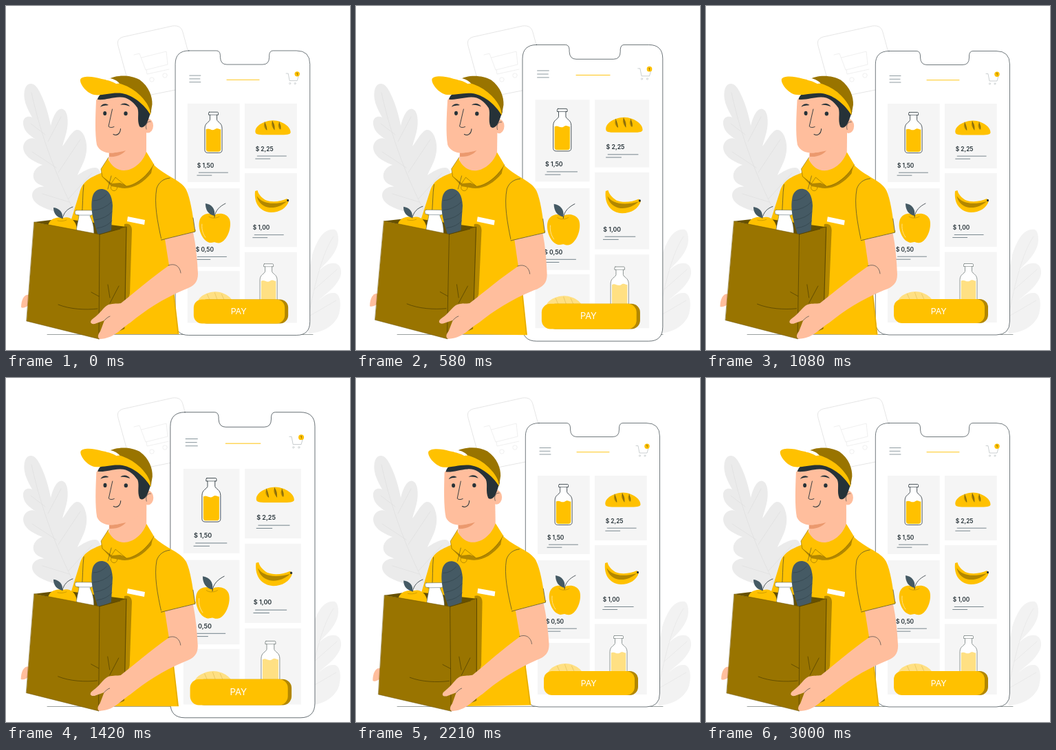
An HTML page with a canvas for the animation above (3.04 s loop, 500 by 500 pixels).

```html
<!DOCTYPE html>
<html lang="en">
<head>
<meta charset="utf-8">
<title>Grocery delivery</title>
<style>
html, body { margin: 0; width: 100%; height: 100%; overflow: hidden; background: #fff; }
canvas { display: block; width: 100vw; height: 100vh; }
</style>
</head>
<body>
<canvas id="stage"></canvas>
<script>
const LOOP = 3040;
const canvas = document.getElementById('stage');
const ctx = canvas.getContext('2d');

const C = {
  yellow: '#ffc100', shade: '#b28700', bag: '#997400', deep: '#665000', pale: '#ffe083',
  slate: '#455a64', ink: '#263238', skin: '#ffbe9d', blush: '#eb996e',
  card: '#f5f5f5', leaf: '#ebebeb', faint: '#e3e3e3'
};

const paths = new Map();
function path(d) {
  if (!paths.has(d)) paths.set(d, new Path2D(d));
  return paths.get(d);
}
function fill(d, color) {
  ctx.fillStyle = color;
  ctx.fill(path(d));
}
function line(d, color = C.ink, width = 0.6) {
  ctx.strokeStyle = color;
  ctx.lineWidth = width;
  ctx.stroke(path(d));
}
function shape(d, color, edge = C.ink, width = 0.6) {
  fill(d, color);
  line(d, edge, width);
}
function dot(x, y, rx, ry, color) {
  ctx.beginPath();
  ctx.ellipse(x, y, rx, ry, 0, 0, Math.PI * 2);
  ctx.fillStyle = color;
  ctx.fill();
}
function ring(x, y, r, color, width = 0.7) {
  ctx.beginPath();
  ctx.arc(x, y, r, 0, Math.PI * 2);
  ctx.strokeStyle = color;
  ctx.lineWidth = width;
  ctx.stroke();
}
function box(x, y, w, h, r, color) {
  ctx.beginPath();
  ctx.roundRect(x, y, w, h, r);
  ctx.fillStyle = color;
  ctx.fill();
}
function text(str, x, y, font, color) {
  ctx.font = font + ' Inter, "Open Sans", sans-serif';
  ctx.fillStyle = color;
  ctx.fillText(str, x, y);
}
function at(x, y, draw) {
  ctx.save();
  ctx.translate(x, y);
  draw();
  ctx.restore();
}

// Two linear beats per loop, then rest.
function phoneScale(t) {
  const rise = 435, fall = 280;
  for (const start of [-10, 1088]) {
    const u = t - start;
    if (u >= 0 && u < rise) return 1 + 0.1 * u / rise;
    if (u >= rise && u < rise + fall) return 1.1 - 0.1 * (u - rise) / fall;
  }
  return 1;
}

// Triangle wave between -1 and 1 degree.
function swayAngle(t) {
  const p = t / LOOP;
  const deg = p < 0.25 ? 4 * p : p < 0.75 ? 2 - 4 * p : 4 * p - 4;
  return deg * Math.PI / 180;
}

function backdrop() {
  fill('M35 113C28 114 25 124 27 136C29 146 34 154 38 162C33 159 26 161 25 168C24 180 33 188 44 194C36 189 25 195 25 206C26 219 40 226 53 231C45 233 38 241 40 250C42 257 50 261 58 263C49 261 38 266 38 275C38 288 56 294 74 300L100 316L140 250C136 237 134 235 129 235C121 235 111 241 104 246C108 235 119 221 117 201C115 184 106 177 100 181C92 187 88 197 82 204C85 192 92 177 89 160C87 149 80 147 75 152C70 157 67 166 65 174C62 158 57 141 50 127C46 118 41 112 35 113Z', C.leaf);
  line('M37 126C48 176 67 236 100 300M36 171L57 187M38 212L73 235M53 273L92 285M80 161L61 197M108 194L76 242M125 243L91 280', '#dcdcdc');

  fill('M478 325C462 322 452 340 445 362L430 440L440 476C455 475 476 469 484 448C488 433 486 418 477 417C468 416 461 423 454 428C465 418 484 406 487 389C488 377 481 373 473 374C465 375 459 381 453 386C463 375 482 360 483 341C483 333 482 327 478 325Z', '#f2f2f2');
  line('M476 335C460 358 448 405 436 470M481 383L448 412M480 428L442 450', C.faint);

  shape('M163 58C161 50 164 47 170 45L242 29C251 28 255 31 257 38L275 104C277 112 274 116 266 118L196 132C187 133 183 130 181 123Z', '#fff', C.faint, 0.9);
  line('M186 71L194 69L203 93L235 85L233 66L197 75M204 93L205 99L237 92', C.leaf, 0.8);
  ring(212, 107, 3.2, C.leaf, 0.8);
  ring(231, 101, 3.2, C.leaf, 0.8);

  line('M60 477.5H446', '#56615f');
}

function bottle(milk, edge) {
  shape('M-6 -29H6Q7 -29 7 -27V-25H5L5 -18C6 -14 12 -14 12.5 -6V26Q12.5 30 8 30H-8Q-12.5 30 -12.5 26V-6C-12 -14 -6 -14 -5 -18L-5 -25H-7V-27Q-7 -29 -6 -29Z', '#fff', edge, 0.8);
  fill('M-10.7 -4C-6 -7 -3 -1 2 -4C6 -7 8 -4 10.7 -4V25Q10.7 28.4 7 28.4H-7Q-10.7 28.4 -10.7 25Z', milk);
  line('M-5 -25H5', edge);
}

function loaf(color) {
  fill('M-25.5 7C-27 -2 -14 -10 0 -10.5C14 -10 26 -1 25.5 7C25 11 16 10.5 0 10.5C-16 10.5 -25 11 -25.5 7Z', color);
}
function slits(color) {
  fill('M-12 -7C-9 -3 -9 1 -9 4C-13 1 -14 -4 -12 -7ZM-1 -9C3 -5 3 -1 2 3C-2 -1 -3 -6 -1 -9ZM9 -7C12 -3 12 0 10 3C7 -1 7 -5 9 -7Z', color);
}

function apple() {
  fill('M0 -14C6 -18 18 -17 22 -8C26 4 18 24 8 26C4 27 2 25 0 25C-3 25 -5 27 -9 25C-19 21 -25 3 -21 -8C-17 -17 -6 -18 0 -14Z', C.yellow);
  line('M-8 -12C-4 -9 2 -9 7 -12', C.shade);
  line('M-18 -1C-19 9 -15 15 -13 18', '#ffe9a8', 0.8);
  line('M0 -11C1 -21 8 -27 16 -31', C.ink, 0.8);
  fill('M-13 -31C-4 -30 2 -23 0 -13C-9 -15 -13 -22 -13 -31Z', C.slate);
}

function banana() {
  fill('M362 269L365.5 268C367 274 371 278 377 282C387 286 399 284 408 280L411 283C408 294 397 300 385 300C370 299 360 288 362 269Z', C.yellow);
  fill('M364.5 276C371 286 385 290 408 284C400 291 390 294.5 380 292.5C371 290 366 284 364.5 276Z', C.shade);
  dot(409.5, 282.5, 1.5, 1.7, C.ink);
}

function price(str, x, y) {
  text(str, x, y, '600 8.4px', C.ink);
  line(`M${x + 2.5} ${y + 7.2}h42M${x} ${y + 11.2}h21`, C.slate, 0.7);
}

function phone(scale) {
  ctx.save();
  ctx.translate(343.7, 271.4);
  ctx.scale(scale, scale);
  ctx.translate(-343.7, -271.4);

  shape('M266 65.5H306Q311 65.5 311.5 72V75Q312 85.5 321 85.5H373Q382.5 85.5 382.5 75V72Q383 65.5 388 65.5H422Q441.5 65.5 441.5 85V458Q441.5 478 422 478H266Q246.3 478 246.3 458V85Q246.3 65.5 266 65.5Z', '#fff', C.ink, 0.65);

  line('M267 101.5h16M267 106.3h15M267 111h16', C.slate);
  line('M321 107.7h47', C.yellow, 0.9);
  line('M407 98.5h3L412 109H423L425 102', '#a8b0b3');
  ring(412.5, 113, 1.1, '#b8bec0', 0.6);
  ring(420, 113, 1.1, '#b8bec0', 0.6);
  dot(423, 99.3, 3.7, 3.7, C.yellow);
  text('1', 421.8, 101.1, '500 5px', C.deep);

  for (const [x, y, h] of [[264, 142, 114], [264, 265, 114], [264, 385, 75], [347, 142, 94], [347, 243, 107], [347, 357.5, 102.5]]) {
    box(x, y, 75.7, h, 0, C.card);
  }
  at(301.6, 183.5, () => bottle(C.yellow, C.ink));
  at(388, 177, () => { loaf(C.yellow); slits(C.shade); line('M-12 -8L-9 3M-1 -9.5L2 3M9 -8L11 2', C.ink, 0.5); });
  at(303, 318, apple);
  banana();
  at(381.5, 403.5, () => bottle(C.pale, '#77807f'));
  at(304.5, 425.5, () => { loaf(C.pale); line('M-12 -7L-8 2M-1 -9L3 2M9 -7L13 2', '#dfba52'); });

  price('$ 1,50', 278, 235);
  price('$ 2,25', 362.7, 211);
  price('$ 0,50', 276, 357);
  price('$ 1,00', 358.7, 325.3);

  box(280, 426, 130, 35, 12, C.shade);
  box(273, 426, 132, 35, 12, C.yellow);
  text('PAY', 326.7, 447.5, '400 12.3px', '#fff');
  ctx.restore();
}

function torso() {
  fill('M150 205L204 180V222C199 246 163 258 149 240Z', C.skin);
  fill('M150 213.5C160 214 169 211 176 207C172 215 161 220 150 219Z', C.blush);

  fill('M138 243C120 250 111 256 107 271L95 310L140 477H251.5L235 338L275 328C271 300 268 280 262 267C254 252 232 248 214 230L204 213C194 238 163 252 148 222Z', C.yellow);
  line('M113 260C111 275 112 290 110 306M226 340C220 313 215 287 219 265C222 256 229 251 238 250');

  fill('M139 247L153 258L166 257C182 266 204 248 214 229L211 243C199 258 182 268 165 264L153 262Z', C.shade);
  fill('M149 220L138 237L140 248L153 258L160 249C153 243 148 235 149 220Z', C.yellow);
  fill('M204 212L215 230C206 246 190 260 175 262L159 249C180 245 197 232 204 212Z', C.yellow);
  line('M149 220L138 237L140 248L153 258L159 249L175 262C190 260 206 246 215 230', C.deep, 0.5);
  ring(157, 264, 4.6, C.shade, 0.9);
  fill('M177 306L202 311L201 318L176 313Z', '#fff');
  fill('M172 317C179 315 183 319 183 326L180 418L172 448Z', C.shade);
  line('M235 338C238 380 246 435 250 476', C.shade, 0.5);
}

function head() {
  fill('M131 137C130 160 129 185 132 202C136 212 148 215 158 213C180 211 196 202 203 188L207 150C190 118 146 115 131 137Z', C.skin);
  dot(206, 174, 8, 10.5, C.skin);
  line('M204 179C202 173 205 167 210 168');

  fill('M133 136C136 124 150 122 167 122C188 122 204 138 211 153C208 161 206 170 202 174C199 177 196 177 194 175C190 165 194 156 191 148C184 138 176 132 165 132.5C153 133 144 137 133 136Z', C.ink);

  dot(143.7, 156, 2.5, 3.1, C.ink);
  dot(174, 156.3, 2.7, 3, C.ink);
  fill('M137 147C139 142 145 141 149 144C146 145 141 144 137 147Z', C.ink);
  fill('M166 144C170 140 177 141 180 146C175 144 171 143 166 144Z', C.ink);
  line('M154.5 150L149 175C151 177 154 177 157 175.5', C.ink, 0.9);
  line('M156 186.5C161 189 166 186 166.5 178.5', C.ink, 1);

  fill('M146 108C160 99 181 100 194 107C208 117 213 132 212.5 143L210 158L200 142Z', C.bag);
  fill('M108 107C110 101 127 102 139 106C160 110 180 115 195 130C206 141 210 150 210 158C201 143 185 130 169 127C153 125 139 131 128 129C118 127 107 114 108 107Z', C.yellow);
  fill('M145 107.5L151 105C157 106 162 109 165 112.5L160 113C155 110 150 108.5 145 107.5Z', '#fff');
}

function groceries() {
  fill('M41 314L82 309L175 321L136 333Z', C.deep);
  fill('M61 326C59 312 70 306 82 308C94 305 104 312 104 332Z', C.yellow);
  line('M75 312C78 313 84 313 88 311', C.shade);
  line('M82 309C84 300 89 295 97 292', C.ink, 0.8);
  fill('M69 293C78 294 83 300 82 309C74 307 69 302 69 293Z', C.slate);
  shape('M102 297H124Q127 297 126 303L122 305C124 311 128 315 128 334H102C102 318 106 311 106 304L101 303Q99 298 102 297Z', '#fff', C.slate, 0.5);
  line('M104 304H123', C.slate, 0.5);
  fill('M125 281C126 271 132 265.5 140 266C149 267 154 275 155 290L153 326L134 334C130 320 122 300 125 281Z', C.slate);
  line('M127 283Q138 283 146 274M127 297Q142 296 153 285M129 311Q145 309 154 299M132 323Q147 321 154 312', '#2f4148');
  line('M148 266L153 247', C.ink, 0.5);
}

function bag() {
  fill('M34 420C27 418 22 426 22 438C25 440 31 437 35 433Z', C.skin);
  groceries();
  shape('M41 314L136 332L175 321L172 469L135 484L30 458Z', C.bag, C.deep, 0.5);
  line('M136 332L135 484M175 321L173 439M136 332L166 324M76 434C93 441 116 442 133 440M124 416L135 422M151 432L164 407M151 424L148 405', '#403500');
}

function arm() {
  fill('M231 339L272 329C276 348 278 369 279 389C279 401 274 407 260 412C227 426 203 442 181 460C164 471 158 483 136 484C133 482 133 478 137 473L143 457L129 462C122 463 121 458 127 454C138 446 142 437 149 434C157 432 162 433 167 432C191 413 210 396 237 377Z', C.skin);
  line('M236 377C246 373 253 379 254 388M143 457C146 454 148 452 151 451');
  fill('M226 340L275 328L276 325L225 338Z', C.yellow);
  line('M226 340L275 328L272 308');
}

function courier(angle) {
  ctx.save();
  ctx.translate(157, 290);
  ctx.rotate(angle);
  ctx.translate(-157, -290);
  torso();
  head();
  bag();
  arm();
  ctx.restore();
}

function resize() {
  const ratio = window.devicePixelRatio || 1;
  canvas.width = Math.round(innerWidth * ratio);
  canvas.height = Math.round(innerHeight * ratio);
}

function frame() {
  const t = performance.now() % LOOP;
  ctx.setTransform(canvas.width / 500, 0, 0, canvas.height / 500, 0, 0);
  ctx.lineCap = ctx.lineJoin = 'round';
  ctx.fillStyle = '#fff';
  ctx.fillRect(0, 0, 500, 500);
  backdrop();
  phone(phoneScale(t));
  courier(swayAngle(t));
  requestAnimationFrame(frame);
}

addEventListener('resize', resize);
resize();
frame();
</script>
</body>
</html>
```
